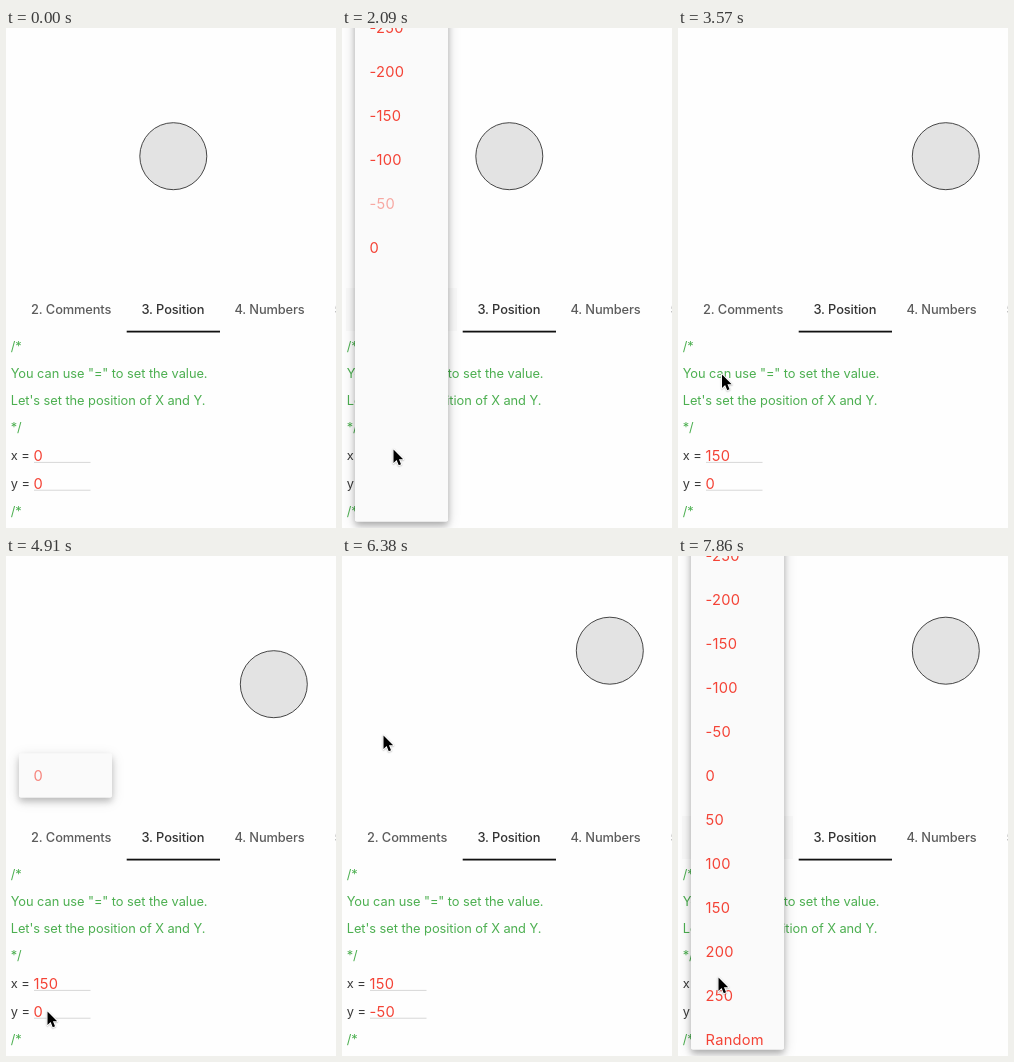
An HTML page with a canvas for the animation above (8000 ms loop, 330 by 500 pixels).

```html
<!DOCTYPE html>
<html lang="en">
<head>
<meta charset="utf-8">
<title>Position lesson</title>
<style>
  html, body { margin: 0; width: 100%; height: 100%; overflow: hidden; background: #fefefe; }
  canvas { display: block; width: 330px; height: 500px; }
</style>
</head>
<body>
<canvas id="stage"></canvas>
<script>
const W = 330, H = 500, LOOP = 8000, TICK = 148.1;
const RED = '#f44336', GREEN = '#4caf50', INK = '#3a3a3a';
const canvas = document.getElementById('stage');
const ctx = canvas.getContext('2d');
const dpr = window.devicePixelRatio || 1;
canvas.width = W * dpr;
canvas.height = H * dpr;

const clamp = v => Math.max(0, Math.min(1, v));
const smooth = v => v * v * (3 - 2 * v);

// Pointer keys: tick, x, y
const POINTER = [
  [5, 133.5, 480], [10, 51.5, 421.5], [16, 51.5, 421.5], [20, 44, 346.5],
  [27, 44, 346.5], [32, 41.5, 455.5], [36, 41.5, 455.5], [37, 27, 386.5],
  [38, 21.5, 310], [39, 26, 238], [40, 37, 191], [41, 41.5, 179.5],
  [45, 41.5, 179.5], [50, 40.5, 421.5], [60, 40.5, 421.5]
];

// Dropdown sessions: opening tick, closing tick, selected value, opening progress per tick
const MENUS = [
  [13, 24, 0, [0.2, 0.71]],
  [33, 43, 0, [0.2, 0.71]],
  [52, 60, 150, [0.52]]
];
const ITEMS = Array.from({ length: 11 }, (_, i) => -250 + 50 * i).concat('Random');
const ITEM_H = 44;
const itemY = i => 219.5 + (i - 5) * ITEM_H;

function text(str, x, y, color, size = 12.83, weight = 400, spacing = -0.05) {
  ctx.font = `${weight} ${size}px Inter, Roboto, sans-serif`;
  ctx.letterSpacing = spacing + 'px';
  ctx.fillStyle = color;
  ctx.fillText(str, x, y);
}

const value = (v, mid) => text(String(v), 27.6, mid + 5.4, RED, 14.67, 400, 0.25);

function drawCircle(x, y) {
  ctx.beginPath();
  ctx.arc(167.3 + x * 0.67, 128.2 + y * 0.67, 33.5, 0, Math.PI * 2);
  ctx.fillStyle = '#e3e3e3';
  ctx.fill();
  ctx.strokeStyle = '#333';
  ctx.lineWidth = 0.9;
  ctx.stroke();
}

function drawTabs() {
  const tab = (label, x, color) => text(label, x, 285.8, color, 12.83, 500, -0.12);
  tab('2. Comments', 25, '#5c5c5c');
  tab('3. Position', 135.4, '#333');
  tab('4. Numbers', 228.4, '#5c5c5c');
  tab('5.', 328.8, '#5c5c5c');
  ctx.fillStyle = '#111';
  ctx.fillRect(120.7, 302.7, 93.3, 1.8);
}

function drawCode(x, y) {
  // Input rows are slightly taller than comment rows
  const mid = i => i < 4 ? 318.3 + 27.2 * i : 427.6 + 27.8 * (i - 4);
  const line = (str, i, color = GREEN) => text(str, 4.7, mid(i) + 4.4, color);
  line('/*', 0);
  line('You can use "=" to set the value.', 1);
  line("Let's set the position of X and Y.", 2);
  line('*/', 3);
  line('/*', 6);
  [['x', x, 4], ['y', y, 5]].forEach(([name, v, i]) => {
    line(name + ' =', i, INK);
    ctx.fillStyle = '#d8d8d8';
    ctx.fillRect(28, mid(i) + 6.3, 56.5, 1);
    value(v, mid(i));
  });
}

function drawCard(top, bottom, alpha) {
  ctx.beginPath();
  ctx.roundRect(13, top, 93, bottom - top, 2);
  ctx.fillStyle = '#fafafa';
  ctx.globalAlpha = alpha;
  for (const [blur, offset, shade] of [[14, 3, 0.16], [6, 4, 0.24]]) {
    ctx.shadowColor = `rgba(0,0,0,${shade})`;
    ctx.shadowBlur = blur * dpr;
    ctx.shadowOffsetY = offset * dpr;
    ctx.fill();
  }
  // Cover the shadow inside the card
  ctx.shadowColor = 'transparent';
  ctx.globalAlpha = 1;
  ctx.fill();
}

function drawMenu(p, selected) {
  const grow = clamp((p - 0.25) / 0.25);
  const mid = itemY(ITEMS.indexOf(selected));
  const top = mid - ITEM_H / 2, bottom = mid + ITEM_H / 2;
  const unit = 0.5 / (ITEMS.length + 1.5);
  const fade = clamp(p / 0.25);

  ctx.save();
  if (grow) {
    ctx.fillStyle = 'rgba(0,0,0,0.02)';
    ctx.fillRect(4, 260, 111, 43);
  }
  drawCard(top + (-20 - top) * grow, bottom + (493.5 - bottom) * grow, fade);
  ITEMS.forEach((item, i) => {
    const shown = item === selected ? fade * fade : clamp((p - 0.5 - (i + 1) * unit) / (1.5 * unit));
    ctx.globalAlpha = shown;
    if (shown) value(item, itemY(i));
  });
  ctx.restore();
}

function drawPointer(tick) {
  const i = POINTER.findIndex(k => k[0] > tick) - 1;
  if (i < 0) return;
  const [t0, x0, y0] = POINTER[i], [t1, x1, y1] = POINTER[i + 1];
  const e = smooth((tick - t0) / (t1 - t0));
  ctx.save();
  ctx.translate(x0 + (x1 - x0) * e, y0 + (y1 - y0) * e);
  ctx.scale(0.94, 0.94);
  const arrow = new Path2D('M0 0V14.4L3.3 11.3L5.6 16.7L8 15.7L5.8 10.4H10.3Z');
  ctx.lineJoin = 'round';
  ctx.lineWidth = 2;
  ctx.strokeStyle = '#fff';
  ctx.shadowColor = 'rgba(0,0,0,0.3)';
  ctx.shadowBlur = 1.5 * dpr;
  ctx.shadowOffsetY = 0.5 * dpr;
  ctx.stroke(arrow);
  ctx.shadowColor = 'transparent';
  ctx.fillStyle = '#000';
  ctx.fill(arrow);
  ctx.restore();
}

function draw(ms) {
  const tick = Math.max(0, Math.floor((ms - 4) / TICK));
  const x = tick >= 24 ? 150 : 0;
  const y = tick >= 43 ? -50 : 0;
  ctx.setTransform(dpr, 0, 0, dpr, 0, 0);
  ctx.fillStyle = '#fefefe';
  ctx.fillRect(0, 0, W, H);
  drawCircle(x, y);
  drawTabs();
  drawCode(x, y);
  const menu = MENUS.find(([open, close]) => tick >= open && tick < close);
  if (menu) drawMenu(menu[3][tick - menu[0]] ?? 1, menu[2]);
  drawPointer(tick);
}

const start = performance.now();
function frame() {
  draw((performance.now() - start) % LOOP);
  requestAnimationFrame(frame);
}
frame();
</script>
</body>
</html>
```
